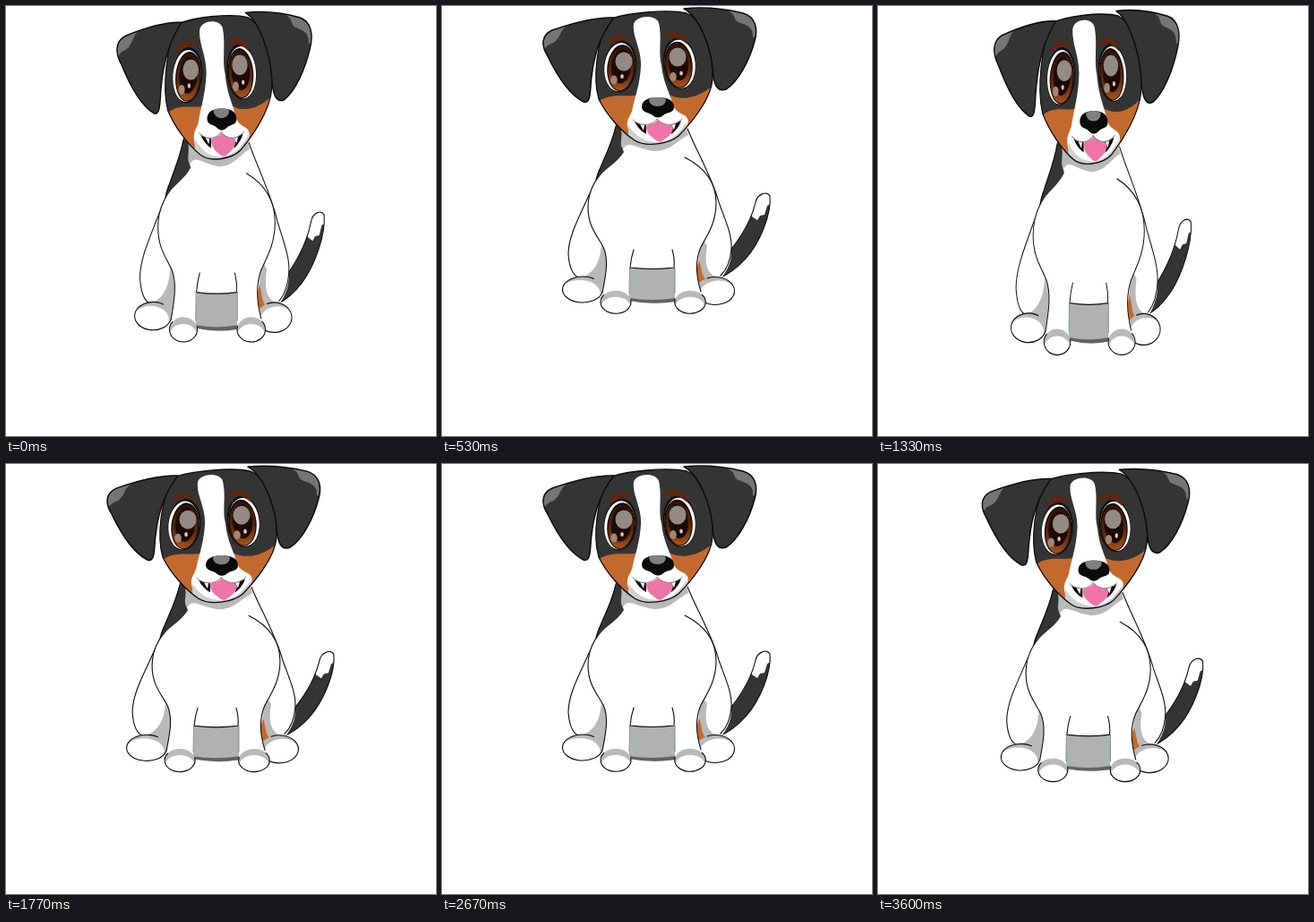
These frames come from a looping animation (480 px wide and 480 px high, 3.63 s). An HTML page with a canvas:

```html
<!DOCTYPE html>
<html lang="en">
<head>
<meta charset="utf-8">
<title>Bouncing puppy</title>
<style>
html, body { margin: 0; width: 100%; height: 100%; overflow: hidden; background: #fff; }
canvas { display: block; width: 480px; height: 480px; }
</style>
</head>
<body>
<canvas id="stage" width="480" height="480"></canvas>
<script>
const ctx = document.getElementById('stage').getContext('2d');
const LOOP = 3630, HOP = LOOP / 4;
const FLOOR = 344, AXIS = 240;
const COAT = '#343434', INK = '#0b0b0b', SHADE = '#b9b9b9', TAN = '#c4692e', BROWN = '#5f2610';

// phase in ms, y of the feet, horizontal stretch
const KEYS = [
  [0, 375, .914], [60, 420, .885], [122, 472, .88], [155, 479, .98],
  [200, 479, 1.12], [237, 479, 1.155], [275, 479, 1.12], [330, 475, .97],
  [370, 436, .88], [407, 402, .855], [445, 375, .885], [480, 357, .935],
  [528, 344, 1], [863, 344, 1], [878, 355, .974], [HOP, 375, .914]
];

function poseAt(phase) {
  const i = Math.max(1, KEYS.findIndex(k => k[0] >= phase));
  const a = KEYS[i - 1], b = KEYS[i];
  const f = (phase - a[0]) / (b[0] - a[0]);
  return { feet: a[1] + (b[1] - a[1]) * f, sx: a[2] + (b[2] - a[2]) * f };
}

function shape(d, fill, stroke, width = 1.1) {
  const p = new Path2D(d);
  if (fill) { ctx.fillStyle = fill; ctx.fill(p); }
  if (stroke) { ctx.strokeStyle = stroke; ctx.lineWidth = width; ctx.stroke(p); }
}

function oval(x, y, rx, ry, fill) {
  ctx.beginPath();
  ctx.ellipse(x, y, rx, ry, 0, 0, Math.PI * 2);
  ctx.fillStyle = fill;
  ctx.fill();
}

function clipped(d, draw) {
  ctx.save();
  ctx.clip(new Path2D(d));
  draw();
  ctx.restore();
}

// shaded at the top, outlined only along the arc from `from` to `to`
function paw(x, y, rx, ry, shiftX, shiftY, from, to) {
  oval(x, y, rx, ry, SHADE);
  ctx.save();
  ctx.clip();
  oval(x + shiftX, y + shiftY, rx, ry, '#fff');
  ctx.restore();
  ctx.beginPath();
  ctx.ellipse(x, y, rx, ry, 0, from, to);
  ctx.strokeStyle = INK;
  ctx.lineWidth = 1.1;
  ctx.stroke();
}

function drawTail() {
  const tail = 'M306 290C324 272 343 249 350 219C352 210 362 206 366 212C368 232 355 264 339 282C330 292 319 300 309 304Z';
  shape(tail, COAT);
  clipped(tail, () => shape('M346 205H370V219L363 223L360 233L355 234L352 239L346 235Z', '#fff'));
  shape(tail, null, INK);
}

function drawBody() {
  // haunches
  shape('M184 165C166 215 141 250 141 277C142 293 147 301 153 305L312 304C319 294 324 285 323 270C321 248 309 210 300 183L275 135H205Z', '#fff');
  shape('M176 182C163 220 141 250 141 277C142 292 146 300 152 303M274 137C283 160 302 192 309 219C317 241 324 256 323 271C322 286 317 295 311 301', null, INK);
  shape('M178 262C178 282 172 296 158 302L184 320L188 276Z', SHADE);
  shape('M291 260C285 275 285 300 290 320L312 304C297 302 292 290 296 268Z', SHADE);
  shape('M287 284C283 295 284 306 287 309L294 305C290 301 290 294 288 287Z', TAN);

  paw(157, 316.5, 22.5, 14.5, -3, 4, .2, 5.3);
  paw(305, 318, 21.5, 15.5, 4, 4, -2, 2.9);

  // between the front legs
  shape('M209 290H260V330Q235 334 209 329Z', '#b0b1b1');
  shape('M209 326Q235 330 260 326V330Q235 334 209 329Z', '#626262');

  // front legs and chest
  shape('M204 150C180 180 163 194 163 225C163 246 173 256 180 269C187 284 182 304 179 321L209 323L210 292Q235 295 260 292V323L290 321C284 303 282 285 289 269C298 252 306 240 306 220C306 195 294 184 271 165L266 145Z', '#fff');
  paw(194, 330.5, 17, 12.8, 0, 7, -.2, 3.8);
  paw(277, 330.5, 17.3, 12.8, 0, 7, -.7, 3.4);
  shape('M190 174C174 189 163 203 163 225C163 246 173 256 180 269C187 284 182 304 179 320M271 169C293 180 306 196 306 220C306 240 298 253 289 269C282 285 284 303 289 319', null, INK);
  shape('M214 272Q211 281 210 292Q235 295 259 292Q260 282 257 272', null, INK);
  shape('M209.500 292L209 321M260 292L260 321', null, '#777', .8);

  // neck
  shape('M194 132C189 156 176 177 172 194C181 182 196 175 203 163C199 155 205 151 204 140Z', COAT);
  shape('M194 135C189 158 176 178 172 194', null, INK);
  shape('M199 134C203 148 197 152 202 160C208 149 216 159 237 162C256 162 262 150 275 144L272 132Z', SHADE);
}

function drawEar(d, tip) {
  shape(d, COAT);
  clipped(d, () => shape(tip, '#757575'));
  shape(d, null, INK, 1.5);
}

function drawEye(x, y, side, glintX, glintY) {
  ctx.save();
  ctx.translate(x, y);
  ctx.rotate(side * .1);
  oval(0, 0, 18.3, 29, '#111');
  oval(-side * .6, .8, 17, 27, '#fff');
  oval(side * 1.1, 1.5, 15.6, 26, '#160804');
  const iris = ctx.createLinearGradient(0, -24, 0, 27);
  iris.addColorStop(0, '#2c1006');
  iris.addColorStop(.6, '#5c270d');
  iris.addColorStop(1, '#a9541f');
  oval(side * 1.1, 2, 14.3, 24.5, iris);
  oval(side * 1.1, 0, 11, 19, '#1d0a04');
  ctx.restore();
  oval(glintX, glintY, 9.5, 10.5, '#948a85');
  oval(x - 7, y + 15, 3.8, 5, '#a18774');
  oval(x + 2, y + 11, 1.8, 2.6, '#d8c8bd');
}

function drawHead() {
  const head = 'M187 15C204 8 252 3 273 8C296 18 304 55 302 82C300 105 277 132 264 145C253 154 228 158 215 150C200 140 184 122 175 104C168 80 173 38 187 15Z';
  shape(head, COAT);
  clipped(head, () => {
    shape('M172 109C187 95 205 103 220 99L224 154H200ZM253 99C268 106 286 103 302 89L299 120L257 154Z', TAN);
    shape('M214 20C217 10 239 9 242 19C246 36 241 52 245 66C247 87 255 98 258 111C262 123 278 119 274 132C264 152 250 159 238 159C224 159 209 148 207 134C206 124 212 122 213 113C216 100 221 86 222 67C223 48 212 34 214 20Z', '#fff');
    shape('M208 133C219 150 230 151 241 152C255 151 265 142 273 130V162H208Z', '#d0d0d0');
  });
  shape(head, null, INK, 1.3);

  drawEar('M192 13C171 12 143 20 123 27C110 33 111 45 118 56C130 81 144 100 158 107C167 110 165 92 167 79C170 51 180 28 192 13Z',
    'M108 20H142C130 27 133 38 122 42Q116 44 114 50Z');
  drawEar('M270 3C290 1 315 3 336 8C350 12 353 25 349 39C343 62 330 85 317 93C306 97 303 85 302 70C300 45 287 12 270 3Z',
    'M320 0H360V34L347 35C348 22 338 21 331 18C325 16 328 9 320 6Z');

  drawEye(199, 67.5, 1, 203, 62);
  drawEye(265, 64, -1, 263, 57);
  shape('M187 43C189 34 199 30 211 36C200 35 194 38 187 43Z', BROWN, BROWN, 2);
  shape('M248 35C257 26 270 30 273 41C265 34 257 32 248 35Z', BROWN, BROWN, 2);

  drawMuzzle();
}

function drawMuzzle() {
  // dark mouth corners with teeth
  shape('M215 129L228 133L228 143Q219 138 215 129ZM267 128L255 133L256 143Q264 137 267 128Z', INK);
  shape('M221 132L226 133L225 139ZM256 133L261 131L259 138Z', '#fff');
  shape('M228 134C232 131 238 132 241 126C246 132 254 131 258 135C258 143 251 147 247 150Q243 153 239 150C234 146 228 143 228 134Z', '#ee74a8');
  shape('M213 127C221 135 235 134 240 126C247 134 259 135 268 126L258 112L222 113Z', '#fff');
  shape('M213 127C221 135 235 134 240 126C247 134 259 135 268 126', null, '#777', .9);
  // nose
  shape('M223 113C223 104 232 102 241 102C250 102 259 104 259 113C259 120 251 118 247 122Q241 127 235 122C231 118 224 120 223 113Z', INK);
  shape('M231 104C235 101 246 101 250 104C250 109 246 112 241 112C235 112 231 109 231 104Z', '#808080');
}

function render(now) {
  const phase = (now % LOOP) % HOP;
  const { feet, sx } = poseAt(phase);
  ctx.setTransform(1, 0, 0, 1, 0, 0);
  ctx.fillStyle = '#fff';
  ctx.fillRect(0, 0, 480, 480);
  ctx.translate(AXIS, feet);
  ctx.scale(sx, sx ** -.85);
  ctx.translate(-AXIS, -FLOOR);
  ctx.lineJoin = ctx.lineCap = 'round';
  drawTail();
  drawBody();
  drawHead();
}

const start = performance.now();
function tick() {
  render(performance.now() - start);
  requestAnimationFrame(tick);
}
tick();
</script>
</body>
</html>
```
